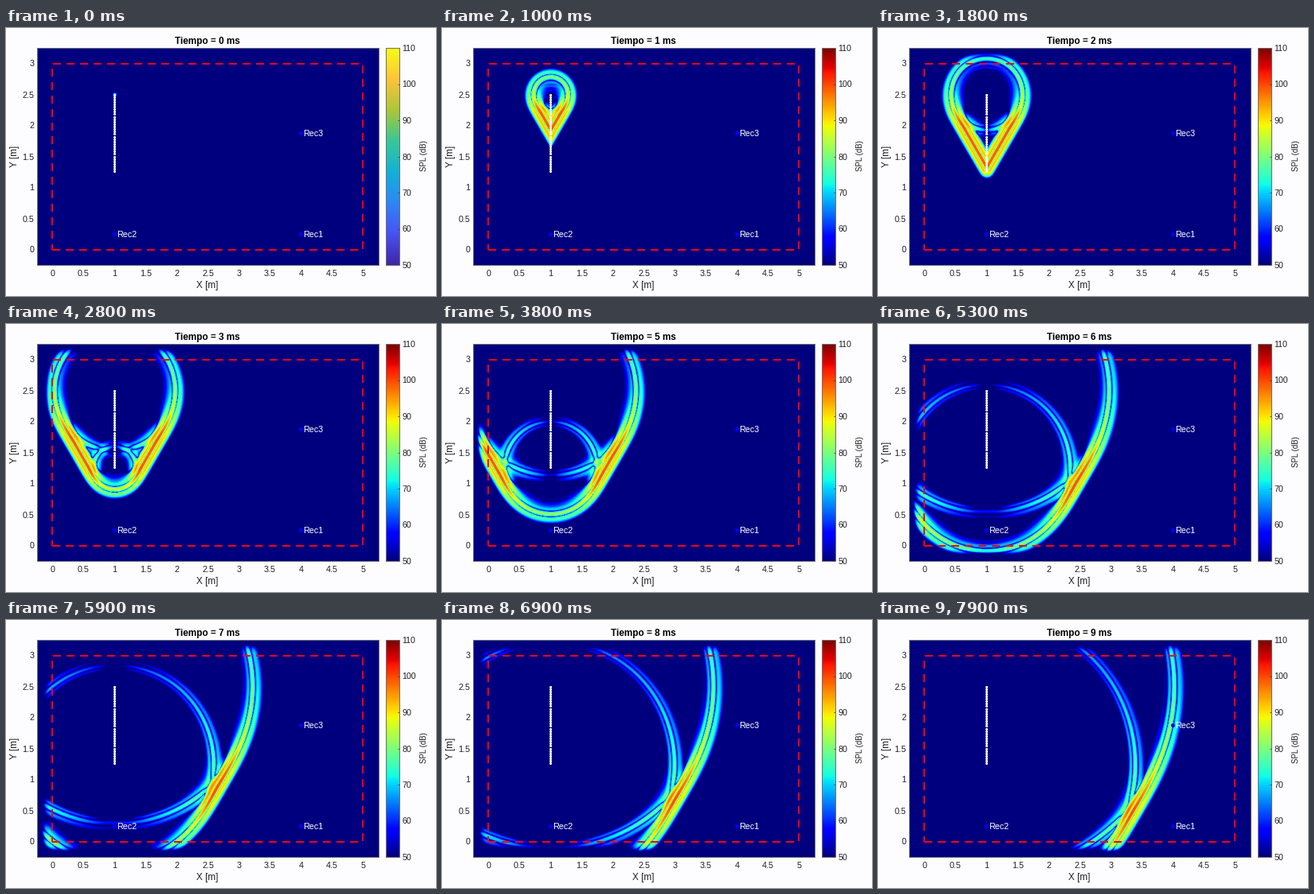
A matplotlib script that plays this animation: 540x337 px, repeating every 8 s.

```python
import matplotlib.pyplot as plt
import numpy as np
from matplotlib.animation import FuncAnimation
from matplotlib.colors import LinearSegmentedColormap
from matplotlib.patches import Rectangle

W, H, DPI = 540, 337, 100
PX = 72 / DPI
FRAMES, INTERVAL, STEPS = 80, 100, 64
INK, EDGE, PAPER = "#202020", "#707070", "#fdfcff"

# Wave simulation: lengths in metres, time expressed as distance travelled
CELL, SUBSTEPS = 0.01, 8
ADVANCE = 0.0503 / SUBSTEPS
COURANT2 = (ADVANCE / CELL) ** 2
PAD = 100
PULSE_DELAY, PULSE_RATE = 0.153, 18.8
SOURCE_Y = 2.5 - 0.04 * np.arange(32)
SOURCE_DELAY = 0.5 * (2.5 - SOURCE_Y)
PEAK_DB = 100
MS_PER_STEP = 7 / 48

plt.rcParams["font.family"] = "Liberation Sans"
parula = LinearSegmentedColormap.from_list("parula_like", [
    "#3e26a8", "#4852f4", "#2e87f7", "#12b1d6",
    "#37c897", "#abc739", "#fec338", "#f9fb15"])


def ricker(distance):
    a2 = (PULSE_RATE * distance) ** 2
    return (1 - 2 * a2) * np.exp(-a2)


def margin_loss():
    """Attenuation in dB of the absorbing layer around the room."""
    x = np.linspace(-0.25, 5.25, 551)
    y = np.linspace(-0.25, 3.25, 351)[:, None]
    depth_x = np.maximum(np.maximum(-x, x - 5), 0) / 0.19
    depth_y = np.maximum(np.maximum(-y / 0.18, (y - 3) / 0.215), 0)
    return 42 * (depth_x ** 3 + depth_y ** 3)


def simulate():
    """Leapfrog wave equation on the half plane right of the array."""
    rows, cols = 351 + 2 * PAD, 426
    row = np.arange(rows)
    outside = np.maximum(np.maximum(PAD - row, row - (rows - 1 - PAD)), 0)
    damp = (0.1 * (outside / PAD) ** 2).astype(np.float32)[:, None]
    keep = (1 - damp) / (1 + damp)
    spread = np.float32(COURANT2) / (1 + damp)
    stay = np.float32(2 - 4 * COURANT2) / (1 + damp)
    source_rows = PAD + np.rint((SOURCE_Y + 0.25) / CELL).astype(int)

    p = np.zeros((rows, cols), np.float32)
    old = np.zeros_like(p)
    fields = []
    for n in range(1, SUBSTEPS * STEPS + 1):
        near = np.zeros_like(p)
        near[1:] += p[:-1]
        near[:-1] += p[1:]
        near[:, 1:] += p[:, :-1]
        near[:, :-1] += p[:, 1:]
        near[:, 0] += p[:, 1]  # mirror symmetry
        old, p = p, spread * near + stay * p - keep * old
        p[source_rows, 0] = ricker(n * ADVANCE - PULSE_DELAY - SOURCE_DELAY)
        if n % SUBSTEPS == 0:
            half = p[PAD:-PAD]
            full = np.concatenate([half[:, 125:0:-1], half], axis=1)
            fields.append(20 * np.log10(np.abs(full) + 1e-9))

    loss = margin_loss()
    levels = [f - loss for f in fields]
    offset = PEAK_DB - levels[30].max()
    return [np.clip(f + offset, 50, 110).astype(np.float32) for f in levels]


def pixel_axes(left, top, width, height):
    ax = fig.add_axes([left / W, 1 - (top + height) / H, width / W, height / H])
    for spine in ax.spines.values():
        spine.set(linewidth=PX, color=EDGE)
    return ax


def label(x, y, text, size, **kw):
    return fig.text(x / W, 1 - y / H, text, fontsize=size * PX,
                    ha="center", va="center", **kw)


fig = plt.figure(figsize=(W / DPI, H / DPI), dpi=DPI, facecolor=PAPER)
levels = simulate()

ax = pixel_axes(39, 25, 429, 273)
wave = ax.imshow(levels[0], origin="lower", extent=(-0.25, 5.25, -0.25, 3.25),
                 cmap="jet", vmin=50, vmax=110, aspect="auto",
                 interpolation="bilinear")
ax.add_patch(Rectangle((0, 0), 5, 3, fill=False, edgecolor="red",
                       linewidth=2 * PX, linestyle=(0, (5, 3.5))))
ax.plot(np.ones_like(SOURCE_Y), SOURCE_Y, "o", color="white",
        markersize=3.1 * PX, markeredgewidth=0, snap=False)
for name, x, y in [("Rec1", 4, 0.25), ("Rec2", 1, 0.25), ("Rec3", 4, 1.88)]:
    ax.plot(x, y, "o", color="blue", markersize=5 * PX, markeredgewidth=0)
    ax.text(x + 0.035, y, name, color="white", fontsize=10.8 * PX,
            ha="left", va="center_baseline")
ax.set(xlim=(-0.25, 5.25), ylim=(-0.25, 3.25))
x_ticks, y_ticks = np.arange(0, 5.1, 0.5), np.arange(0, 3.1, 0.5)
ax.set_xticks(x_ticks, [f"{v:g}" for v in x_ticks])
ax.set_yticks(y_ticks, [f"{v:g}" for v in y_ticks])
ax.tick_params(length=0, labelsize=10.7 * PX, labelcolor=INK)
ax.tick_params(axis="x", pad=6.5 * PX)
ax.tick_params(axis="y", pad=3.5 * PX)

bar_ax = pixel_axes(477, 25, 17, 273)
bar = bar_ax.imshow(np.linspace(50, 110, 256)[:, None], origin="lower",
                    extent=(0, 1, 50, 110), aspect="auto", cmap="jet")
bar_ax.set_xticks([])
bar_ax.yaxis.tick_right()
bar_ax.set_yticks(range(50, 111, 10))
bar_ax.tick_params(axis="y", direction="in", length=2.5 * PX, width=0.5,
                   color=INK, labelcolor=INK, labelsize=10.6 * PX, pad=3.5 * PX)

title = label(253, 17, "", 11.75, weight="bold", color="black")
label(253, 324.5, "X [m]", 11.7, color=INK)
label(11, 161, "Y [m]", 11.7, color=INK, rotation=90)
label(525.5, 161, "SPL (dB)", 9.8, color=INK, rotation=90)


def update(frame):
    step = frame - (frame + 3) // 5  # every fifth picture is held
    wave.set_data(levels[step])
    bar.set_cmap(parula if step == 0 else "jet")
    title.set_text(f"Tiempo = {round((step + 1) * MS_PER_STEP)} ms")
    return wave, bar, title


anim = FuncAnimation(fig, update, frames=FRAMES, interval=INTERVAL,
                     repeat=True, repeat_delay=0)
plt.show()
```
